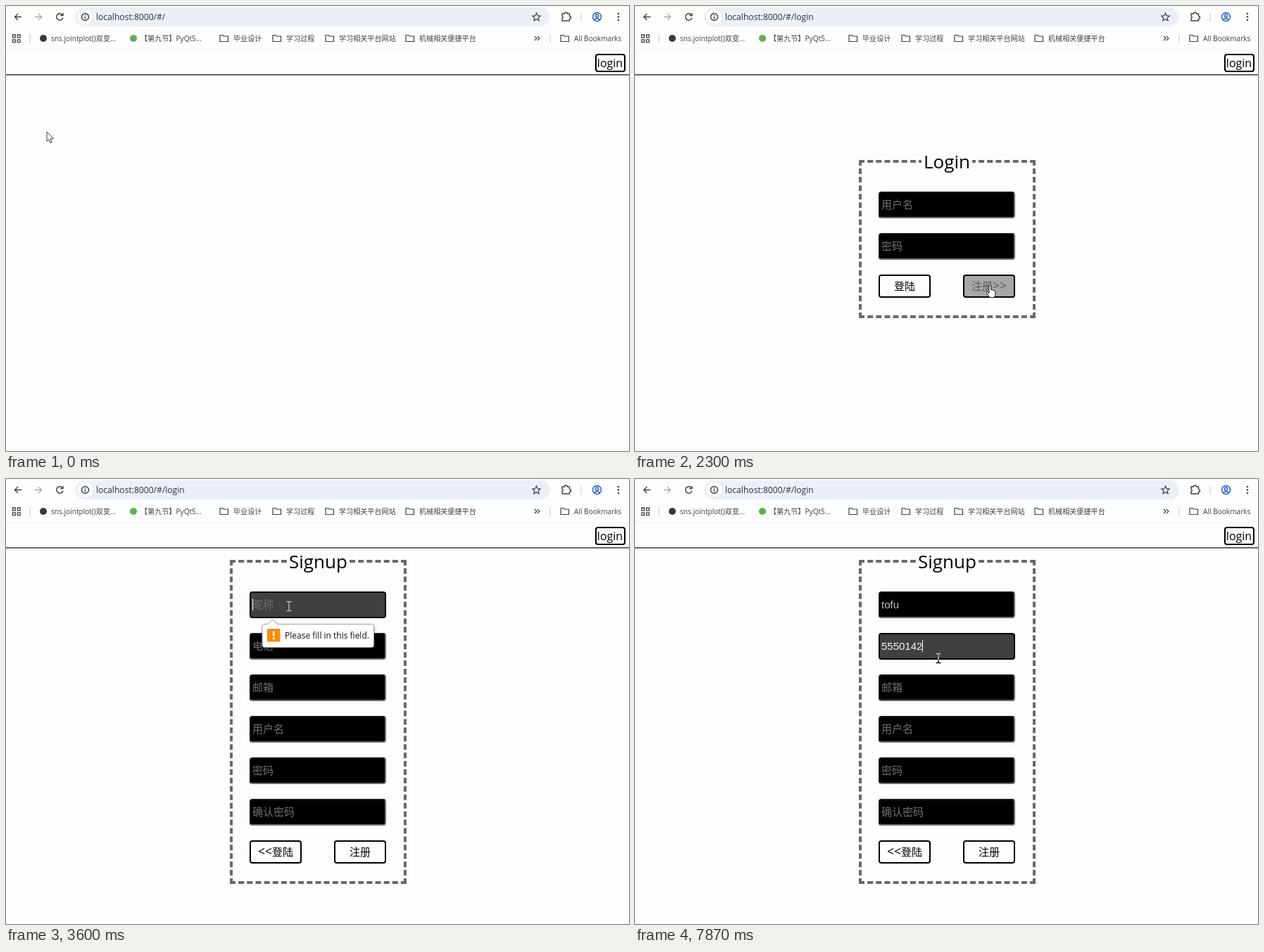
An HTML page that plays this animation: 885x633 px, repeating every 8000 ms.

```html
<!DOCTYPE html>
<html lang="zh">
<head>
<meta charset="utf-8">
<title>Login demo</title>
<style>
html, body { margin: 0; width: 100%; height: 100%; overflow: hidden; background: #fdfdfd; }
#stage { position: relative; width: 885px; height: 633px; overflow: hidden; background: #fdfdfd;
  font-family: "Open Sans", "Noto Sans CJK SC", "Noto Sans CJK", sans-serif; }
#stage > * { position: absolute; box-sizing: border-box; }
svg { overflow: visible; }
svg text { white-space: pre; }
.btn { border: 2px solid #000; border-radius: 4px; text-align: center; white-space: nowrap; }
.btn b { font-weight: 400; font-size: 17.5px; line-height: 1px; }
.field { left: 346px; width: 194px; height: 38px; padding-left: 2px; border: 2px inset #6c6c6c; border-radius: 4px;
  background: #000; font: 15px/34px "Liberation Sans", "Noto Sans CJK SC", "Noto Sans CJK", sans-serif; white-space: nowrap; }
.field span { display: inline-block; height: 34px; vertical-align: top; }
.field i { display: inline-block; width: 1px; height: 17px; margin: 8px -1px 0 0; vertical-align: top; background: #eee; }
#frame { left: 318px; width: 251px; border: 4px dashed #696969; }
#legend { text-align: center; font-size: 26px; line-height: 36px; background: #fdfdfd; }
#popup { left: 350px; top: 260px; width: 202px; height: 29px; padding-left: 10px; border-radius: 4px; background: #fff;
  box-shadow: 0 1px 3px rgba(0,0,0,.35); font-size: 12px; line-height: 29px; color: #222; }
#status { left: 0; top: 619px; width: 116px; height: 24px; border-radius: 0 4px 0 0; background: #dde7f7;
  color: #6b6b6b; font-size: 10.4px; line-height: 20px; padding-left: 2px; }
#beam { mix-blend-mode: difference; }
</style>
</head>
<body>
<div id="stage">
  <svg id="chrome" width="885" height="100" style="left:0;top:0" fill="none" stroke="#3c4043" stroke-width="1.4">
    <rect x="98" y="2" width="675" height="27" rx="13.5" fill="#ebf0f7" stroke="none"/>
    <circle cx="112.500" cy="15.500" r="10.500" fill="#fdfdfd" stroke="none"/>
    <path d="M22 15.500H12.500M17 11l-4.500 4.500 4.500 4.500"/>
    <path stroke="#a9abae" d="M41 15.500h9.500M46 11l4.500 4.500-4.500 4.500"/>
    <path d="M80 12.500a4.700 4.700 0 1 0 .9 4.200M81 10v3.500h-3.800"/>
    <circle cx="112.500" cy="15.500" r="5"/>
    <path d="M112.500 14.800v3.600M112.500 12.300v1.400"/>
    <path stroke-width="1.2" d="M753.500 10l1.650 3.700 4 .4-3 2.700.9 4-3.550-2.100-3.550 2.100.9-4-3-2.700 4-.4z"/>
    <path d="M790 11h3.500a2 2 0 0 1 4 0h3v3.500a2 2 0 0 1 0 4V21H790v-3.200a2 2 0 0 0 0-3.600z"/>
    <path stroke="#ccd6e6" d="M817 10v12M34 40v13M773 40v13"/>
    <g stroke="#1f57b8"><circle cx="839.500" cy="15.500" r="6"/><circle cx="839.500" cy="14" r="2"/><path d="M835.300 19.500q4.200-3.600 8.400 0"/></g>
    <g fill="#3c4043" stroke="none"><circle cx="870" cy="11" r="1.300"/><circle cx="870" cy="15.500" r="1.300"/><circle cx="870" cy="20" r="1.300"/></g>
    <path stroke-width="1.300" d="M9.500 41h3.800v3.800H9.500zM16.300 41h3.800v3.800h-3.800zM9.500 47.800h3.800v3.800H9.500zM16.300 47.800h3.800v3.800h-3.800z"/>
    <path stroke-width="1.2" d="M751 43l3 3-3 3M755 43l3 3-3 3"/>
    <circle cx="53" cy="46" r="5" fill="#383838" stroke="none"/>
    <circle cx="181" cy="46" r="5" fill="#58b34d" stroke="none"/>
    <g id="marks"></g>
    <rect x="0" y="62" width="885" height="1" fill="#f0f0ec" stroke="none"/>
    <rect x="0" y="97.200" width="885" height="1.300" fill="#181820" stroke="none"/>
    <text id="url" x="128" y="19.500" font-size="12.100" fill="#303236" stroke="none"></text>
  </svg>
  <div id="login" class="btn" style="left:837px;top:68px;width:43px;height:26px;font-size:16px;line-height:22px;text-indent:-1px">login</div>
  <div id="frame"></div>
  <div id="legend"></div>
  <div id="left" class="btn" style="left:346px;width:74px;height:33px;font-size:15px;line-height:29px"></div>
  <div id="right" class="btn" style="left:466px;width:74px;height:33px;font-size:15px;line-height:29px"></div>
  <svg id="tip" width="159" height="42" style="left:364px;top:199px">
    <path d="M3 7.500H7.500L14.500 .8 21.500 7.500H155.500a3 3 0 0 1 3 3V37.500a3 3 0 0 1-3 3H3a3 3 0 0 1-3-3V10.500a3 3 0 0 1 3-3z"
      fill="#fff" stroke="#a0a0a0" style="filter:drop-shadow(1px 2px 2px rgba(0,0,0,.25))"/>
    <rect x="7" y="14" width="18.500" height="18.500" rx="1" fill="#f98b0b"/>
    <path d="M16.200 17.500v7M16.200 26.700v2.500" stroke="#fff" stroke-width="2.600"/>
    <text x="32" y="28" font-size="12" fill="#111">Please fill in this field.</text>
  </svg>
  <div id="popup">5550142</div>
  <div id="status">localhost:8000/#/login</div>
  <svg id="arrow" width="12" height="18"><path d="M0 0V13.500L3 10.700 5.100 15.500 7.300 14.600 5.200 9.900H9.600z" fill="#fff" stroke="#222" stroke-width=".9"/></svg>
  <svg id="hand" width="14" height="20"><path d="M0 1.500Q0-.2 1.400-.2T2.800 1.500V7Q4.300 6 5.200 7.400 6.700 6.700 7.300 8.200 9 7.800 9 9.800V13Q8.500 15 7.400 17.500H.6Q-.8 14.500-3.400 11.600-4.400 9.800-2.400 9.700L0 11.500z" fill="#fff" stroke="#111"/></svg>
  <svg id="beam" width="8" height="14"><path d="M-3.500-6.500H-1L0-5.800 1-6.500H3.500M0-6V6M-3.500 6.500H-1L0 5.800 1 6.500H3.500" fill="none" stroke="#fff" stroke-width="1.300"/></svg>
</div>
<script>
const LOOP = 8000, FADE = 500;
const OPEN_LOGIN = 1500, OPEN_SIGNUP = 2470, FOCUS_NAME = 2485, FOCUS_PHONE = 5140;
const NAME = 'tofu', PHONE = '5550142';
const nameKeys = [4270, 4340, 4420, 4500];
const phoneKeys = [6200, 6600, 6800, 7100, 7330, 7530, 7870];
const path = [
  [0, 58, 179], [30, 58, 179], [100, 65, 180], [270, 65, 180], [800, 737, 128], [970, 737, 128],
  [1180, 850, 86], [1790, 850, 86], [2250, 503, 397], [2600, 505, 399], [2640, 505, 399],
  [3430, 430, 215], [3600, 402, 181], [4790, 402, 181], [5130, 431, 232], [5200, 431, 232],
  [5600, 433, 240], [5700, 431, 255]
];
const labels = {
  login: ['用户名', '密码'],
  signup: ['昵称', '电话', '邮箱', '用户名', '密码', '确认密码']
};
const bookmarks = [
  [64, 'sns.jointplot()双变...'], [191, '【第九节】PyQt5...'], [323, '毕业设计', 1], [398, '学习过程', 1],
  [473, '学习相关平台网站', 1], [587, '机械相关便捷平台', 1], [807, 'All Bookmarks', 1]
];

const $ = id => document.getElementById(id);
const clamp = v => Math.max(0, Math.min(1, v));
const ramp = (t, a, b) => clamp((t - a) / (b - a));
const lerp = (a, b, k) => a + (b - a) * k;
const smooth = k => k * k * (3 - 2 * k);
const grey = v => { const n = Math.round(v); return `rgb(${n},${n},${n})`; };
const show = (el, on) => { el.style.display = on ? '' : 'none'; };

// CSS "ease": cubic-bezier(.25, .1, .25, 1)
function ease(x) {
  x = clamp(x);
  const bez = (p, q, s) => 3 * p * s * (1 - s) ** 2 + 3 * q * s * s * (1 - s) + s ** 3;
  let lo = 0, hi = 1;
  for (let i = 0; i < 20; i++) {
    const mid = (lo + hi) / 2;
    if (bez(.25, .25, mid) < x) lo = mid; else hi = mid;
  }
  return bez(.1, 1, lo);
}
// Rises from start, falls back from end
function pulse(t, start, end) {
  const up = ease((Math.min(t, end) - start) / FADE);
  return up * (1 - ease((t - end) / FADE));
}

function pointer(t) {
  let i = 0;
  while (i < path.length - 1 && path[i + 1][0] <= t) i++;
  const a = path[i], b = path[i + 1] || a;
  const k = a === b ? 0 : smooth(ramp(t, a[0], b[0]));
  return [lerp(a[1], b[1], k), lerp(a[2], b[2], k)];
}

$('marks').innerHTML = bookmarks.map(([x, label, folder]) =>
  (folder ? `<path stroke-width="1.2" d="M${x - 19} 41.500h4l1.500 1.500h6v7.500h-11.500z"/>` : '') +
  `<text x="${x}" y="50" font-size="10.1" fill="#3c4043" stroke="none">${label}</text>`).join('');

const fields = labels.signup.map(() => {
  const el = document.createElement('div');
  el.className = 'field';
  el.innerHTML = '<span></span><i></i><span></span>';
  $('stage').insertBefore(el, $('tip'));
  const [value, caret, hint] = el.children;
  return { el, value, caret, hint };
});

function paintField(f, label, top, value, focus, focused, caretOn) {
  f.el.style.top = top + 'px';
  f.el.style.background = grey(64 * focus);
  f.el.style.borderStyle = focused ? 'solid' : 'inset';
  f.el.style.borderColor = grey(108 * (1 - focus));
  f.value.textContent = value;
  f.value.style.color = grey(lerp(190, 245, focus));
  f.hint.textContent = value ? '' : label;
  f.hint.style.color = grey(112);
  f.caret.style.visibility = focused && caretOn ? 'visible' : 'hidden';
}

function paintButton(el, k) {
  el.style.background = k > 0.001 ? grey(253 * (1 - k)) : 'transparent';
  el.style.color = grey(255 * k);
}

function paintForm(t, mode) {
  const signup = mode === 'signup';
  for (const id of ['frame', 'legend', 'left', 'right']) show($(id), mode);
  const names = labels[mode] || [];
  const top = signup ? 115 : 219;
  const typed = (text, keys) => text.slice(0, keys.filter(k => k <= t).length);
  const resets = [FOCUS_NAME, 3600, ...nameKeys, 5195, ...phoneKeys].filter(k => k <= t);
  const caretOn = !resets.length || (t - resets[resets.length - 1]) % 1000 < 500;
  const values = signup ? [typed(NAME, nameKeys), typed(PHONE, phoneKeys)] : [];
  const focus = signup ? [pulse(t, FOCUS_NAME, FOCUS_PHONE), ease((t - FOCUS_PHONE) / FADE)] : [];
  const active = !signup ? -1 : t >= FOCUS_PHONE ? 1 : t >= FOCUS_NAME ? 0 : -1;

  fields.forEach((f, i) => {
    show(f.el, i < names.length);
    if (i < names.length)
      paintField(f, names[i], Math.round(top + 45.4 + 58.9 * i), values[i] || '', focus[i] || 0, i === active, caretOn);
  });
  if (!mode) return;

  const bottom = signup ? 514 : 382;
  $('frame').style.top = top + 'px';
  $('frame').style.height = (signup ? 461 : 225) + 'px';
  const legend = $('legend');
  legend.textContent = signup ? 'Signup' : 'Login';
  legend.style.left = (signup ? 400 : 407) + 'px';
  legend.style.width = (signup ? 87 : 72) + 'px';
  legend.style.top = top - 16 + 'px';
  $('left').style.top = $('right').style.top = bottom + 'px';
  $('left').innerHTML = signup ? '<b>&lt;&lt;</b>登陆' : '登陆';
  $('right').innerHTML = signup ? '注册' : '注册<b>&gt;&gt;</b>';
  paintButton($('left'), 0);
  paintButton($('right'), pulse(t, 2190, OPEN_SIGNUP));
}

function paintPointer(t, mode) {
  const [x, y] = pointer(t);
  const inside = (l, top, w, h) => x >= l && x <= l + w && y >= top && y <= top + h;
  const onTip = t > 2600 && t < 4270 && inside(364, 206, 158, 34);
  const onField = !onTip && fields.some((f, i) =>
    i < (labels[mode] || []).length && inside(346, parseFloat(f.el.style.top), 194, 38));
  const onButton = inside(837, 68, 43, 26) || (mode === 'login' && inside(466, 382, 74, 33));
  const kind = onField ? 'beam' : onButton ? 'hand' : 'arrow';
  for (const id of ['arrow', 'hand', 'beam']) {
    show($(id), id === kind);
    $(id).style.left = x + 'px';
    $(id).style.top = y + 'px';
  }
}

function render(t) {
  const mode = t >= OPEN_SIGNUP ? 'signup' : t >= OPEN_LOGIN ? 'login' : '';
  $('url').textContent = 'localhost:8000/#/' + (mode ? 'login' : '');
  paintButton($('login'), pulse(t, 1120, 1840));
  paintForm(t, mode);

  const tip = ramp(t, 2560, 2760) * (1 - ramp(t, 4270, 4480));
  show($('tip'), tip > 0);
  $('tip').style.opacity = tip;
  $('tip').style.transform = `scale(${lerp(.96, 1, tip)})`;
  $('status').style.opacity = ramp(t, 1250, 1450) * (1 - ramp(t, 1900, 2100));
  show($('popup'), t >= 6230 && t < 6400);
  paintPointer(t, mode);
}

const start = performance.now();
function tick() {
  render((performance.now() - start) % LOOP);
  requestAnimationFrame(tick);
}
tick();
</script>
</body>
</html>
```
